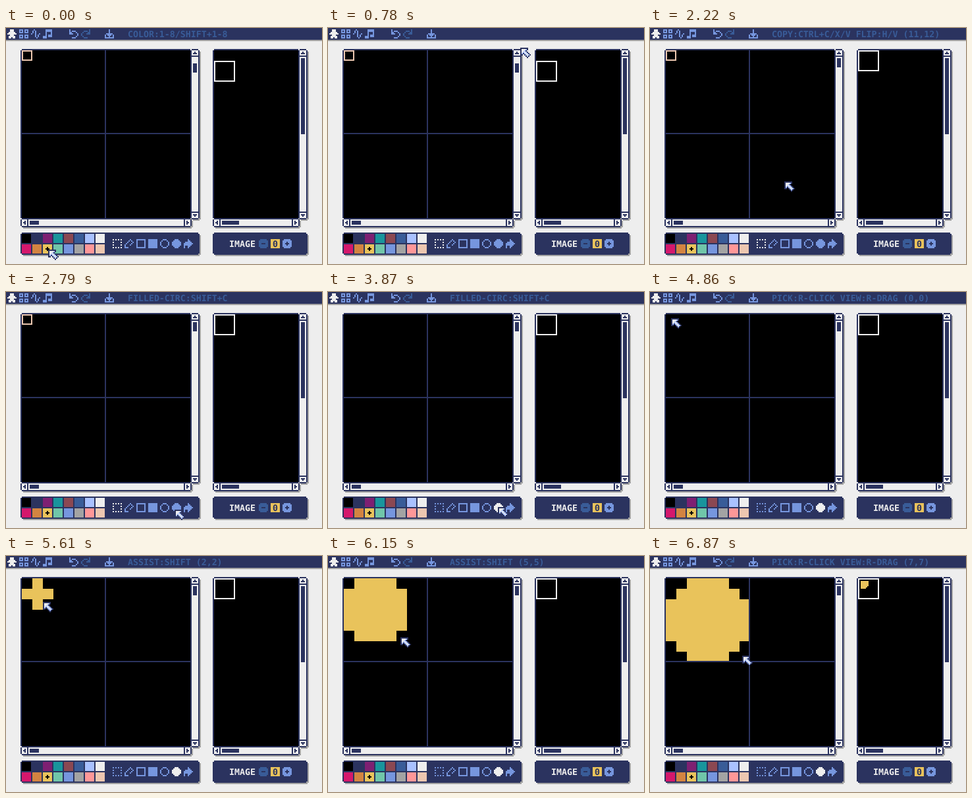
An HTML page for the animation above (9 s loop, 480 px wide and 360 px high).

```html
<!DOCTYPE html>
<html lang="en">
<head>
<meta charset="utf-8">
<title>Pixel editor</title>
<style>
html, body { margin: 0; width: 100%; height: 100%; overflow: hidden; background: #eee; }
svg { display: block; width: 480px; height: 360px; }
text {
  font: bold 6.645px "DejaVu Sans Mono", monospace;
  text-rendering: geometricPrecision;
  white-space: pre;
}
</style>
</head>
<body>
<svg id="stage" viewBox="0 0 240 180" shape-rendering="crispEdges"></svg>
<script>
const LOOP = 9000, STEP = 30;
const PALETTE = ['#000000', '#2b335f', '#7e2072', '#19959c', '#8b4852', '#395c98', '#a9c1ff', '#eeeeee',
  '#d4186c', '#d38441', '#e9c35b', '#70c6a9', '#7696de', '#a3a3a3', '#ff9798', '#edc7b0'];
const [BLACK, NAVY, , , , BLUE, PALE, WHITE, , , YELLOW, , SKY, GREY, , PEACH] = PALETTE;

const rect = (x, y, w, h, fill, attrs = '') =>
  `<rect x="${x}" y="${y}" width="${w}" height="${h}" fill="${fill}" ${attrs}/>`;
const outline = (x, y, w, h, color, attrs = '') =>
  `<rect x="${x + .5}" y="${y + .5}" width="${w - 1}" height="${h - 1}" fill="none" stroke="${color}" ${attrs}/>`;
const shape = (x, y, d, fill, attrs = '') =>
  `<path transform="translate(${x} ${y})" d="${d}" fill="${fill}" ${attrs}/>`;
const label = (x, y, str, fill, attrs = '') =>
  `<text x="${x - .5}" y="${y}" fill="${fill}" ${attrs}>${str}</text>`;
const rounded = (x, y, w, h, fill) =>
  rect(x + 1, y, w - 2, h, fill) + rect(x, y + 1, w, h - 2, fill);

const panel = (x, y, w, h) =>
  rect(x + 2, y + h, w - 2, 1, GREY) + rect(x + w, y + 2, 1, h - 2, GREY) +
  rect(x + w - 1, y + h - 1, 1, 1, GREY) + rounded(x, y, w, h, NAVY);

const hScroll = (x, y, w, size) => panel(x, y, w, 7) +
  rect(x + 1, y + 1, 4, 5, WHITE) + rect(x + 6, y + 1, w - 12, 5, WHITE) + rect(x + w - 5, y + 1, 4, 5, WHITE) +
  shape(x + 2, y + 2, 'M0 1h1v-1h1v3h-1v-1h-1z', NAVY) +
  shape(x + w - 4, y + 2, 'M0 0h1v1h1v1h-1v1h-1z', NAVY) +
  rect(x + 7, y + 2, size, 3, NAVY);

const vScroll = (x, y, h, size, id) => panel(x, y, 7, h) +
  rect(x + 1, y + 1, 5, 4, WHITE, `id="${id}Up"`) + rect(x + 1, y + 6, 5, h - 12, WHITE) +
  rect(x + 1, y + h - 5, 5, 4, WHITE) +
  shape(x + 2, y + 2, 'M1 0h1v1h1v1h-3v-1h1z', NAVY) +
  shape(x + 2, y + h - 4, 'M0 0h3v1h-1v1h-1v-1h-1z', NAVY) +
  rect(x + 2, y + 7, 3, size, NAVY, `id="${id}Thumb"`);

// 7x7 icons
const box = 'M0 0h7v7h-7z';
const disc = 'M2 0h3v1h1v1h1v3h-1v1h-1v1h-3v-1h-1v-1h-1v-3h1v-1h1z';
const square = (x, y) => `M${x} ${y}h3v3h-3zm1 1v1h1v-1z`;
const dots = Array.from({ length: 16 }, (_, i) => [i % 4 * 2, (i >> 2) * 2])
  .filter(([x, y]) => x % 6 === 0 || y % 6 === 0)
  .map(([x, y]) => `M${x} ${y}h1v1h-1z`).join('');
const icons = {
  figure: 'M2 0h3v2h1v1h1v1h-2v1h1v2h-2v-1h-1v1h-2v-2h1v-1h-2v-1h1v-1h1z',
  tiles: square(0, 0) + square(4, 0) + square(0, 4) + square(4, 4),
  wave: 'M0 3h1v1h-1zM1 1h1v2h-1zM2 0h1v1h-1zM3 1h1v5h-1zM4 6h1v1h-1zM5 4h1v2h-1zM6 3h1v1h-1z',
  notes: 'M2 0h5v6h-3v-2h2v-2h-3v5h-3v-2h2z',
  undo: 'M0 0h1v2h1v1h1v1h-3zM2 1h3v1h-3zM5 2h1v1h-1zM6 3h1v2h-1zM5 5h1v1h-1zM2 6h3v1h-3z',
  save: 'M3 0h1v3h2v1h-1v1h-1v1h-1v-1h-1v-1h-1v-1h2zM0 4h1v2h5v-2h1v3h-7z',
  pencil: 'M4 0h1v1h-1zM3 1h1v1h-1zM5 1h1v1h-1zM2 2h1v1h-1zM6 2h1v1h-1zM1 3h1v1h-1zM5 3h1v1h-1zM0 4h1v2h3v-2h1v1h-1v1h-1v1h-3z',
  bucket: 'M3 0h1v1h1v1h1v1h1v1h-1v1h-1v1h-1v1h-1v-2h-2v2h-1v-4h1v-1h2z'
};
const hollow = d => d + 'M1 1v5h5v-5z';
const ring = disc + 'M2 1v1h-1v3h1v1h3v-1h1v-3h-1v-1z';
const tools = [
  [dots, 'SELECT:S'], [icons.pencil, 'PENCIL:P'], [hollow(box), 'RECTANGLE:R'],
  [box, 'FILLED-RECT:SHIFT+R'], [ring, 'CIRCLE:C'],
  [disc, 'FILLED-CIRC:SHIFT+C'], [icons.bucket, 'BUCKET:B']
];
const plus = 'M1 0h1v1h1v1h-1v1h-1v-1h-1v-1h1z';

const swatches = PALETTE.map((c, i) => rect(12 + i % 8 * 8, 157 + (i >> 3) * 8, 7, 7, c)).join('');
const toolbar = tools.map(([d], i) => shape(81 + i * 9, 161, d, SKY, `id="tool${i}" fill-rule="evenodd"`)).join('');
const sparkle = [[4, 1], [3, 2], [2, 3], [4, 3], [1, 4], [3, 4], [5, 4], [4, 5], [6, 5], [5, 6]]
  .map(([x, y]) => `M${x} ${y}h1v1h-1z`).join('');

document.getElementById('stage').innerHTML =
  rect(0, 0, 240, 180, WHITE) + rect(0, 0, 240, 9, NAVY) + rect(0, 9, 240, 1, GREY) +
  shape(1, 1, icons.figure, WHITE) + shape(10, 1, icons.tiles, SKY, 'fill-rule="evenodd"') +
  shape(19, 1, icons.wave, SKY) + shape(28, 1, icons.notes, SKY) +
  shape(48, 1, icons.undo, SKY) +
  `<g transform="translate(64 1) scale(-1 1)"><path d="${icons.undo}" fill="${BLUE}"/></g>` +
  shape(75, 1, icons.save, SKY) + label(93, 7, '', BLUE, 'id="help"') +
  // canvas
  panel(11, 16, 130, 130) + hScroll(11, 145, 130, 7) + vScroll(140, 16, 130, 7, 'canvas') +
  rect(12, 17, 128, 128, BLACK) + `<path id="paint" fill="${YELLOW}"/>` +
  rect(75, 17, 1, 128, NAVY) + rect(12, 80, 128, 1, NAVY) +
  outline(12, 17, 8, 8, PEACH, 'id="selection"') +
  // image viewer
  panel(157, 16, 66, 130) + hScroll(157, 145, 66, 13) + vScroll(222, 16, 130, 58, 'viewer') +
  rect(158, 17, 64, 128, BLACK) + `<path id="preview" fill="${YELLOW}"/>` +
  `<g id="focus">${outline(158, 17, 16, 16, WHITE)}${outline(159, 18, 14, 14, BLACK)}</g>` +
  // palette, tools, image number
  panel(11, 156, 136, 17) + swatches + shape(30, 167, plus, BLACK) + toolbar +
  panel(157, 156, 72, 17) + label(170, 167, 'IMAGE', WHITE) +
  rounded(192, 161, 7, 7, BLUE) + rect(194, 164, 3, 1, NAVY) +
  rect(201, 161, 7, 7, YELLOW) + label(203, 167, '0', NAVY) +
  rounded(210, 161, 7, 7, SKY) + shape(212, 163, plus, NAVY) +
  `<g id="cursor">` +
  shape(0, 0, 'M0 0h6v2h-1v1h1v1h1v1h1v1h-1v1h-1v1h-1v-1h-1v-1h-1v-1h-1v1h-2z', NAVY) +
  shape(0, 0, 'M1 1h4v1h-1v1h1v1h1v1h1v1h-1v1h-1v-1h-1v-1h-1v-1h-1v1h-1z', WHITE) +
  shape(0, 0, sparkle, PALE) + `</g>`;

const $ = id => document.getElementById(id);

// Pointer strokes as [time, x, y]; the pointer rests between strokes
const strokes = [
  [[30, 32, 169], [240, 66, 124], [450, 120, 50], [600, 141, 22], [750, 146, 15], [960, 145, 17]],
  [[1980, 145, 17], [2100, 125, 65], [2220, 102, 117], [2430, 112, 148], [2700, 126, 164], [2970, 130, 167]],
  [[3840, 130, 167], [3870, 129, 164], [4110, 65, 90], [4350, 25, 38], [4770, 18, 22], [4860, 16, 20]],
  [[5400, 16, 20], [5610, 28, 35], [6000, 48, 55], [6330, 63, 70], [6570, 70, 76]]
];

function slope(keys, i, axis) {
  const a = keys[i - 1], b = keys[i + 1];
  return a && b ? (b[axis] - a[axis]) / (b[0] - a[0]) : 0;
}

function pointerAt(t) {
  const keys = strokes.filter(s => s[0][0] <= t).pop() || strokes[0];
  const last = keys[keys.length - 1];
  if (t <= keys[0][0]) return keys[0].slice(1);
  if (t >= last[0]) return last.slice(1);
  const i = keys.findIndex(k => k[0] > t) - 1;
  const a = keys[i], b = keys[i + 1], span = b[0] - a[0], u = (t - a[0]) / span;
  return [1, 2].map(axis => Math.round(
    a[axis] * (1 + 2 * u) * (1 - u) ** 2 + b[axis] * u * u * (3 - 2 * u) +
    span * u * (1 - u) * (slope(keys, i, axis) * (1 - u) - slope(keys, i + 1, axis) * u)));
}

const within = (x, y, left, top, w, h) => x >= left && x < left + w && y >= top && y < top + h;

function helpText(x, y, state) {
  if (within(x, y, 12, 17, 128, 128)) {
    const at = `(${(x - 12) >> 3},${((y - 17) >> 3) + state.scroll})`;
    if (state.dragging) return `ASSIST:SHIFT ${at}`;
    return (state.tool === 0 ? 'COPY:CTRL+C/X/V FLIP:H/V ' : 'PICK:R-CLICK VIEW:R-DRAG ') + at;
  }
  if (within(x, y, 12, 157, 64, 16)) return 'COLOR:1-8/SHIFT+1-8';
  const tool = tools.find((_, i) => within(x, y, 81 + i * 9, 161, 7, 7));
  return tool ? tool[1] : '';
}

// Filled ellipse spanning w x h cells
function ellipse(w, h, left, top, cell) {
  const radius2 = n => Math.max(.1, n * n / 4 - .4);
  let d = '';
  for (let j = 0; j < h; j++) for (let i = 0; i < w; i++) {
    const dx = i - (w - 1) / 2, dy = j - (h - 1) / 2;
    if (dx * dx / radius2(w) + dy * dy / radius2(h) <= 1)
      d += `M${left + i * cell} ${top + j * cell}h${cell}v${cell}h${-cell}z`;
  }
  return d;
}

function draw(time) {
  const t = Math.floor(time / STEP + 1e-6) * STEP;
  const [x, y] = pointerAt(t);
  const state = {
    scroll: t < 1350 ? 8 : 0,
    tool: t < 3450 ? 0 : 5,
    dragging: t >= 5220 && t < 6840
  };
  const pressed = (t >= 1350 && t < 1470) || (t >= 1680 && t < 1800);
  const painted = t >= 5220;

  $('cursor').setAttribute('transform', `translate(${x} ${y})`);
  $('help').textContent = helpText(x, y, state);
  $('canvasUp').setAttribute('fill', pressed ? NAVY : WHITE);
  $('canvasThumb').setAttribute('y', 23 + state.scroll / 2);
  $('focus').setAttribute('transform', `translate(0 ${state.scroll})`);
  $('selection').style.display = state.tool === 0 ? '' : 'none';
  tools.forEach((_, i) => $('tool' + i).setAttribute('fill', i === state.tool ? WHITE : SKY));

  const cols = ((x - 12) >> 3) + 1, rows = ((y - 17) >> 3) + 1;
  $('paint').setAttribute('d', painted ? ellipse(cols, rows, 12, 17, 8) : '');
  $('preview').setAttribute('d', painted && !state.dragging ? ellipse(cols, rows, 158, 17, 1) : '');
}

const start = performance.now();
function tick() {
  draw((performance.now() - start) % LOOP);
  requestAnimationFrame(tick);
}
tick();
</script>
</body>
</html>
```
